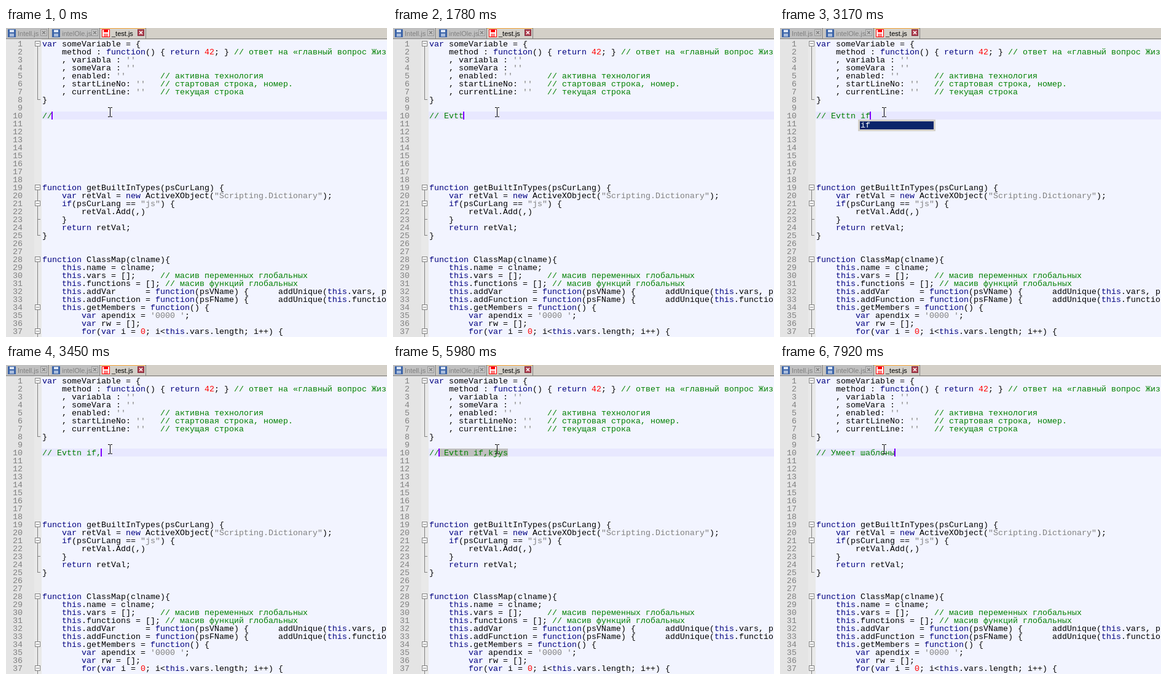
These frames come from a looping animation (620x503 px, 8 s). An HTML page:

```html
<!DOCTYPE html>
<html lang="ru">
<head>
<meta charset="utf-8">
<style>
html, body { margin: 0; width: 620px; height: 503px; overflow: hidden; }
body { position: relative; background: #f2f4ff; }
body > * { position: absolute; }
svg { left: 0; top: 0; }
pre, #popup { margin: 0; font: 13.333px/13px "Liberation Mono", monospace; color: #000; }
#code { left: 59px; top: 20px; }
#numbers { left: 0; top: 20px; width: 27px; text-align: right; color: #808080; }
#current { left: 58px; top: 136px; width: 562px; height: 13px; background: #e8e8ff; }
#selection { top: 136px; height: 13px; background: #c0c0c0; }
#typed { left: 59px; top: 137px; color: #008000; }
#caret { top: 136px; width: 2px; height: 13px; background: #8000ff; }
#popup { left: 127px; top: 149px; width: 126px; height: 19px; box-sizing: border-box;
  border: 3px solid #d4d0c8; padding-left: 1px; background: #0a246a; color: #fff; }
.comment { color: #008000; }
.string { color: #808080; }
.number { color: #f00; }
.keyword { color: #000080; }
</style>
</head>
<body>
<svg id="chrome" width="620" height="503" font-family="Liberation Sans, sans-serif" font-size="11"></svg>
<pre id="numbers"></pre>
<div id="current"></div>
<div id="selection"></div>
<pre id="code"></pre>
<pre id="typed"></pre>
<div id="caret"></div>
<div id="popup">if</div>
<svg width="620" height="503" fill="none" stroke="#000">
  <path d="M166 129.5h3M170 129.5h3M169.5 130v14M166 144.5h3M170 144.5h3"/>
</svg>
<script>
const source = `var someVariable = {
    method : function() { return 42; } // ответ на «главный вопрос Жизни»
    , variabla : ''
    , someVara : ''
    , enabled: ''       // активна технология
    , startLineNo: ''   // стартовая строка, номер.
    , currentLine: ''   // текущая строка
}










function getBuiltInTypes(psCurLang) {
    var retVal = new ActiveXObject("Scripting.Dictionary");
    if(psCurLang == "js") {
        retVal.Add(,)
    }
    return retVal;
}


function ClassMap(clname){
    this.name = clname;
    this.vars = [];     // масив переменных глобальных
    this.functions = []; // масив функций глобальных
    this.addVar      = function(psVName) {      addUnique(this.vars, psVName); }
    this.addFunction = function(psFName) {      addUnique(this.functions, psFName); }
    this.getMembers = function() {
        var apendix = '0000 ';
        var rw = [];
        for(var i = 0; i<this.vars.length; i++) {`;

const $ = id => document.getElementById(id);
const rect = (x, y, w, h, fill, extra = '') =>
  `<rect x="${x}" y="${y}" width="${w}" height="${h}" fill="${fill}" ${extra}/>`;
const path = (d, stroke, width = 1) =>
  `<path d="${d}" fill="none" stroke="${stroke}" stroke-width="${width}"/>`;

const token = new RegExp([
  /(?<comment>\/\/.*)/, /(?<string>'[^'\n]*'|"[^"\n]*")/, /\b(?<number>\d+)\b/,
  /\b(?<keyword>var|function|return|new|if|for|this)\b/
].map(part => part.source).join('|'), 'g');

function highlight(text) {
  return text.replace(/</g, '&lt;').replace(token, (all, ...rest) => {
    const groups = rest.at(-1);
    return `<span class="${Object.keys(groups).find(name => groups[name])}">${all}</span>`;
  });
}

function tab(x, width, label, active) {
  const ink = active ? '#f00' : '#3c64a8';
  const cross = x + width - 14;
  return rect(x, 0, width, 17, active ? '#d4d0c8' : '#c0c0c0') +
    (active ? path(`M${x} .5h${width}`, '#faaa3c') : '') +
    path(`M${x + width - .5} 0V17`, '#808080') +
    rect(x + 3.5, 2.5, 12, 12, active ? '#fff' : ink, `stroke="${ink}"`) +
    rect(x + 6, 3, 7, 4, active ? ink : '#dce6f5') +
    rect(x + 6, 9, 7, 5, active ? '#ff8080' : '#a8bcdc') +
    `<text x="${x + 19}" y="13" fill="${active ? '#000' : '#808080'}">${label}</text>` +
    rect(cross + .5, 2.5, 10, 10, active ? '#b04050' : '#c8c8c8', `stroke="${active ? '#803040' : '#989898'}"`) +
    path(`M${cross + 3} 5l5 5m0 -5l-5 5`, active ? '#fff' : '#808080', 1.5);
}

const rowMid = line => 12.5 + line * 13;
const foldBox = line => rect(47.5, rowMid(line) - 4, 8, 8, '#fff', 'stroke="#808080"') +
  path(`M49 ${rowMid(line)}h5`, '#808080');
const foldLine = (from, to) => path(`M51.5 ${rowMid(from)}V${rowMid(to)}`, '#808080');
const foldEnd = line => path(`M51 ${rowMid(line)}h5`, '#808080');

$('chrome').innerHTML =
  rect(0, 0, 620, 19, '#d4d0c8') +
  tab(0, 70, 'Intell.js') + tab(72, 81, 'intelOle.js') + tab(153, 75, '_test.js', true) +
  path('M0 17.5H620', '#808080') +
  rect(0, 18, 46, 485, '#e4e4e4') + rect(46, 18, 12, 485, '#e9e9e9') +
  foldLine(1, 8) + foldLine(19, 25) + foldLine(28, 39) +
  [8, 23, 25].map(foldEnd).join('') + [1, 19, 21, 28, 34, 37].map(foldBox).join('');
$('numbers').textContent = source.split('\n').map((_, i) => i + 1).join('\n');
$('code').innerHTML = highlight(source);

const mistyped = '// Evttn if,kjys', corrected = '// Умеет шаблоны';
// Moments of the key presses, in ms
const typing = [150, 980, 1390, 1660, 1780, 2090, 2340, 2770, 2920, 3450, 3730, 3880, 4460, 4590];
const selecting = [5540, 5820, 5980, 6250];   // Shift+Home, then Shift+Right
const replacing = 7920;
const keys = [0, ...typing, ...selecting, replacing];
const blink = 270;

function draw() {
  const time = performance.now() % 8000;
  const pressed = list => list.filter(moment => moment <= time).length;
  const length = 2 + pressed(typing);
  const moves = pressed(selecting);
  const column = moves && time < replacing ? moves - 1 : length;
  const sinceKey = time - keys[pressed(keys) - 1];

  $('typed').textContent = (time < replacing ? mistyped : corrected).slice(0, length);
  $('selection').style.left = 59 + column * 8 + 'px';
  $('selection').style.width = (length - column) * 8 + 'px';
  $('caret').style.left = Math.max(59, 58 + column * 8) + 'px';
  $('caret').hidden = Math.floor(sinceKey / blink) % 2 === 1;
  // Completion list opens shortly after "if" is typed
  $('popup').hidden = !(length === 11 && sinceKey >= 250);
  requestAnimationFrame(draw);
}
draw();
</script>
</body>
</html>
```
